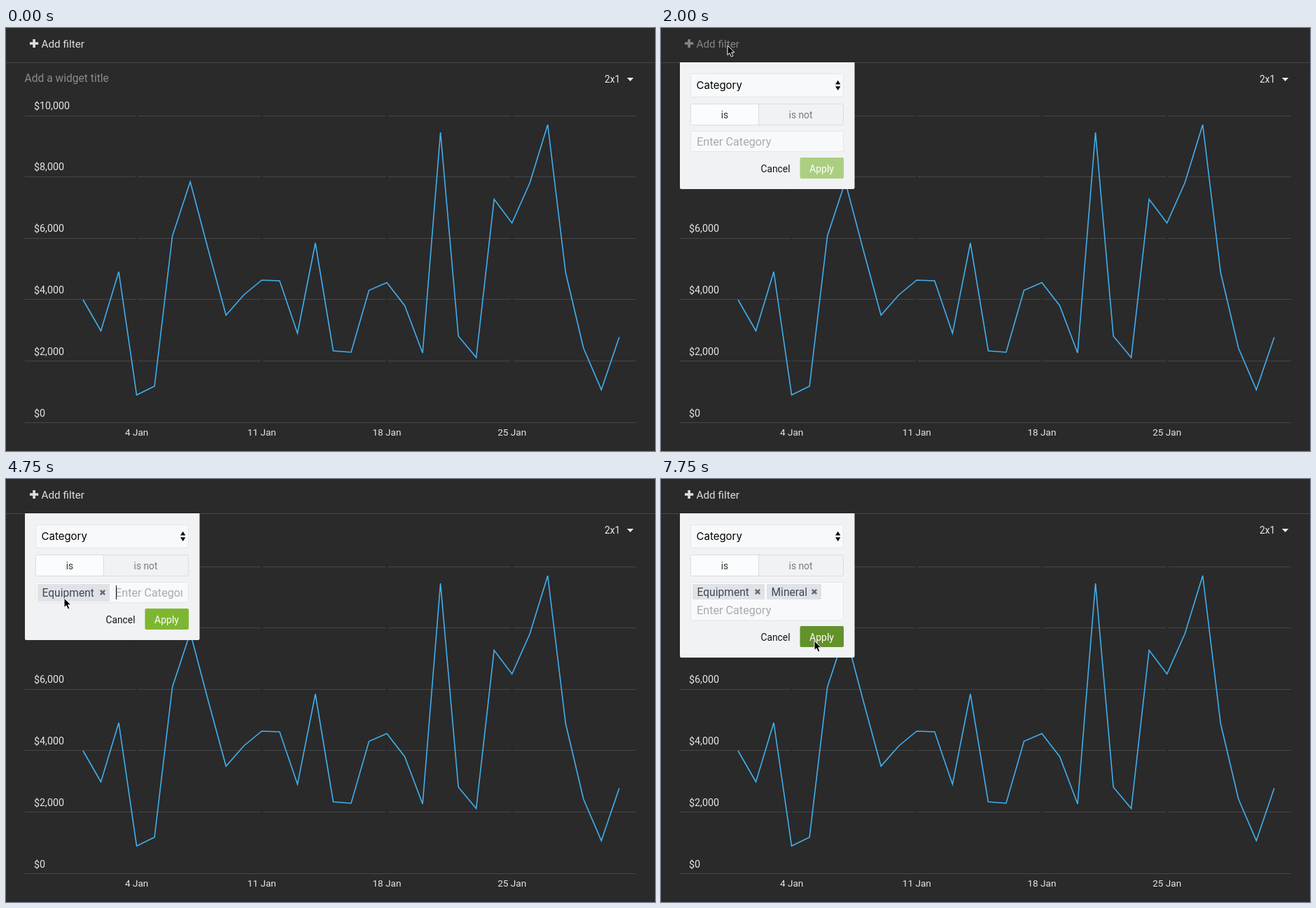
Write an HTML page that moves like this. It is 927x604 px and loops after 8000 ms.

```html
<!DOCTYPE html>
<html lang="en">
<head>
<meta charset="utf-8">
<title>Chart filter</title>
<style>
  html, body { margin: 0; width: 100%; height: 100%; overflow: hidden; background: #2a2a2a; }
  svg { display: block; }
  text { font: 15.6px Roboto, sans-serif; white-space: pre; }
  .small { font-size: 13.8px; }
  .axis { font-size: 14.3px; fill: #e6e6e6; }
  .date { font-size: 13.6px; fill: #e6e6e6; text-anchor: middle; }
  .mid { text-anchor: middle; }
  .grid { stroke: #464646; }
  .box { fill: #f8f9fa; stroke: #e4e6e9; }
  .hint { font-size: 16.2px; fill: #a8abb0; }
  .typed { font-size: 16.2px; fill: #33373d; }
  .item { fill: #3f4752; }
  .chip rect { fill: #dfe3e7; }
  .chip path { stroke: #666c73; stroke-width: 2.6; }
  .bold { font-weight: 700; }
  .italic { font-style: italic; }
</style>
</head>
<body>
<svg width="927" height="604" viewBox="0 0 927 604">
  <rect width="927" height="604" fill="#2a2a2a"/>
  <path class="grid" d="M0 49.5H927"/>
  <g id="addFilter" fill="#dedede">
    <path d="M38.3 16h3.6v4.2h4.3v3.6h-4.3V28h-3.6v-4.2H34v-3.6h4.3z"/>
    <text x="50.5" y="28" style="font-size:15.3px">Add filter</text>
  </g>
  <text x="26.5" y="77" fill="#8b8b8b">Add a widget title</text>
  <text x="855" y="78" class="small" fill="#ececec">2x1</text>
  <path d="M887 71h9.4l-4.7 5z" fill="#ececec"/>
  <g id="chart"></g>

  <g id="panel" data-on="1750-8000">
    <path id="sheet" fill="#f1f2f4"/>
    <rect class="box" x="42.5" y="65.5" width="218" height="33" rx="2"/>
    <text x="50.5" y="87.3" style="font:15px Inter,sans-serif">Category</text>
    <path d="M249 80.5l3.7-5.7 3.7 5.7zM249 83.3h7.4l-3.7 5.7z" fill="#111"/>
    <rect x="42.5" y="108.5" width="218" height="30" rx="2" fill="#f1f2f4" stroke="#d9dce0"/>
    <path d="M43 109h96v29h-96z" fill="#fbfcfd"/>
    <path d="M139.500 109v29" stroke="#d9dce0"/>
    <text x="91" y="129" class="small mid" fill="#333">is</text>
    <text x="199.500" y="129" class="small mid" fill="#777b80">is not</text>
    <rect id="field" class="box" x="42.500" y="147.500" width="218" height="29" rx="2"/>

    <g id="footer">
      <text x="142.500" y="205.500" class="small" fill="#151515">Cancel</text>
      <rect id="apply" x="198.500" y="185" width="62.500" height="30" rx="2"/>
      <text x="229.500" y="205.500" class="small mid" fill="#fff" style="font-size:14px">Apply</text>
    </g>

    <text data-on="1750-3750" class="hint" x="51" y="168">Enter Category</text>
    <rect data-on="3750-4500" x="52" y="152" width="106" height="20" fill="#fff"/>
    <svg data-on="4500-5250" x="156" y="148" width="96" height="28">
      <text class="hint" x="0" y="20">Enter Category</text>
    </svg>
    <rect data-on="5250-6500" x="152" y="152" width="100" height="20" fill="#fff"/>
    <text data-on="6500-8000" class="hint" x="51" y="193">Enter Category</text>

    <g data-on="4500-8000" class="chip">
      <rect id="chipBack" x="45" y="150" width="103" height="25" rx="1"/>
      <g id="chipFace">
        <text class="item" x="51.500" y="168">Equipment</text>
        <path d="M134.800 158.800l6.400 6.400m0-6.400l-6.400 6.400"/>
      </g>
    </g>
    <g data-on="6500-8000" class="chip">
      <rect x="151" y="150" width="78" height="22" rx="1"/>
      <text class="item" x="157.500" y="167">Mineral</text>
      <path d="M215.800 157.800l6.400 6.400m0-6.400l-6.400 6.400"/>
    </g>

    <text id="typed" class="typed" y="168"></text>
    <rect id="caret" data-on="2750-3250 3750-6900 7250-7750" width="1" height="20" fill="#111"/>

    <g data-on="4000-4500 6000-6500">
      <path d="M43 177h217v67q0 2-2 2H45q-2 0-2-2z" fill="#f8f9fb"/>
      <path d="M43 181h217v30H43z" fill="#f0f2f4"/>
      <path d="M43 176.500h217" stroke="#dde0e4"/>
      <text data-on="4000-4500" class="item" x="59" y="201.500"><tspan class="bold">Eq</tspan>uipment</text>
      <text data-on="4000-4500" class="item italic" x="60" y="232">eq</text>
      <text data-on="6000-6500" class="item" x="59" y="201.500"><tspan class="bold">Min</tspan>eral</text>
      <text data-on="6000-6500" class="item italic" x="60" y="232">min</text>
    </g>
  </g>

  <path id="cursor" data-on="500-8000" d="M0 0V13.600L3.100 10.700 5.400 15.900 7.900 14.800 5.700 9.800H10z"
    fill="#000" stroke="#fff" stroke-width="1" stroke-linejoin="round"/>
</svg>
<script>
const LOOP = 8000, TICK = 250;
const $ = id => document.getElementById(id);
const set = (id, attrs) => Object.entries(attrs).forEach(([k, v]) => $(id).setAttribute(k, v));

// Daily values as heights on the stage, 1 to 31 January
const days = [388, 432.500, 348, 524, 511.500, 297, 219.500, 316, 410, 381, 360, 361, 436, 307, 461,
  463, 374.500, 363.500, 396.500, 464, 149, 440, 470.500, 244.500, 278.500, 221, 138, 349, 457, 516.500, 441.500];
const dayX = i => 110 + i * 25.530;

function drawChart() {
  const weeks = [4, 11, 18, 25];
  let out = '';
  for (let i = 0; i < 6; i++) {
    const y = Math.round(125 + i * 87.750);
    out += `<path class="grid" d="M27 ${y - (i ? .5 : 0.500) + (i === 0 ? 1 : 0)}H900"/>`;
    out += `<text class="axis" x="40" y="${115.500 + i * 87.800}">$${(10000 - i * 2000).toLocaleString('en-US')}</text>`;
  }
  for (const day of weeks) {
    const x = dayX(day - 1);
    out += `<path d="M${x} 120V555" stroke="#2a2a2a" stroke-width="3"/>`;
    out += `<text class="date" x="${x}" y="582">${day} Jan</text>`;
  }
  const line = days.map((y, i) => `${dayX(i)},${y}`).join(' ');
  $('chart').innerHTML = out +
    `<polyline points="${line}" fill="none" stroke="#42aff0" stroke-width="1.600"/>`;
}

// Latest entry at or before t
const at = (steps, t) => steps.filter(s => s[0] <= t).pop()[1];

const typing = [[0, ''], [3750, 'e'], [4000, 'eq'], [4500, ''], [5250, 'm'], [5500, 'mi'], [5750, 'min'], [6500, '']];
const applyFill = [[0, '#abcf80'], [4500, '#93c256'], [4750, '#7db731'], [7500, '#63912a']];
const moves = [
  [500, 1250, [360, 210], [95, 25]],
  [2000, 2500, [95, 25], [83, 170]],
  [6750, 7250, [83, 170], [219, 231]],
];

function cursorAt(t) {
  const [from, to, a, b] = moves.filter((m, i) => !i || m[0] <= t).pop();
  const p = Math.min(1, Math.max(0, (t - from) / (to - from)));
  const eased = p * p * (3 - 2 * p);
  return a.map((v, i) => v + (b[i] - v) * eased);
}

const timed = [...document.querySelectorAll('[data-on]')].map(el => ({
  el, spans: el.dataset.on.split(' ').map(s => s.split('-').map(Number)),
}));

function render(t) {
  for (const { el, spans } of timed)
    el.style.display = spans.some(([a, b]) => t >= a && t < b) ? '' : 'none';

  const opening = t < 2000, tall = t >= 6500;
  const grow = tall ? 25 : 0;
  set('addFilter', { opacity: t >= 1250 && t < 2250 ? .5 : 1 });
  set('panel', {
    opacity: opening ? .42 : 1,
    transform: opening ? 'translate(27 49) scale(.75) translate(-27 -49)' : '',
  });
  set('sheet', { d: `M27 49h249.500v${179 + grow}q0 2-2 2H29q-2 0-2-2z` });
  set('field', { height: 29 + grow + (tall ? .5 : 0) });
  set('footer', { transform: `translate(0 ${grow})` });
  set('apply', { fill: at(applyFill, t) });
  set('chipBack', { height: tall ? 22 : 25 });
  set('chipFace', { transform: `translate(0 ${tall ? -1 : 0})` });

  const x = t >= 4500 && !tall ? 156 : 51;
  const word = at(typing, t);
  $('typed').textContent = word;
  set('typed', { x });
  set('caret', { x: Math.round(x + (word ? $('typed').getComputedTextLength() : 1)), y: 152 + grow });
  set('cursor', { transform: `translate(${cursorAt(t)})` });
}

drawChart();
const start = performance.now();
function frame() {
  const elapsed = (performance.now() - start) % LOOP;
  render(Math.floor(elapsed / TICK) * TICK);
  requestAnimationFrame(frame);
}
frame();
</script>
</body>
</html>
```
